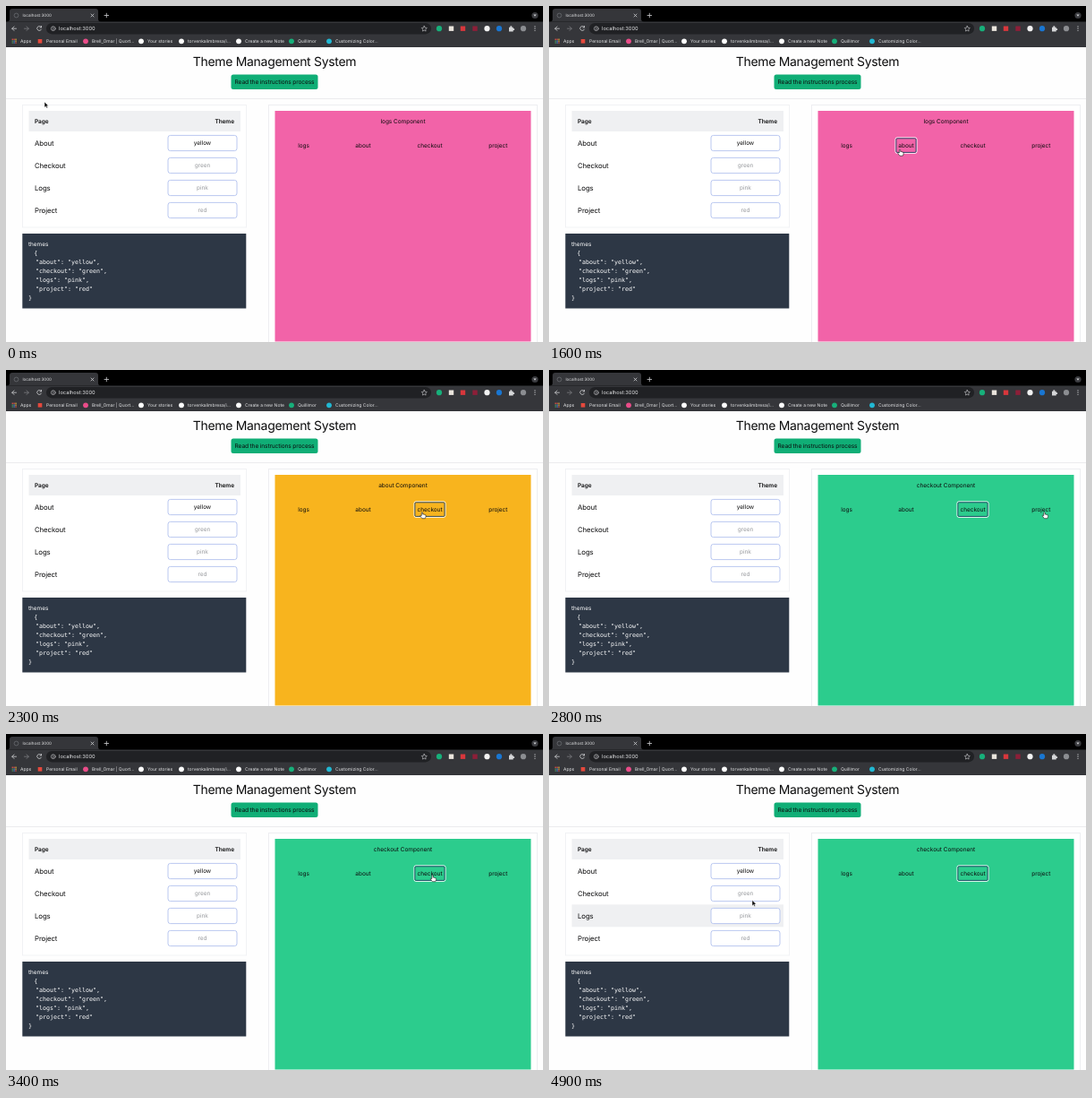
Write an HTML page that moves like this. It is 600 by 375 pixels and loops after 5000 ms.

```html
<!DOCTYPE html>
<html lang="en">
<head>
<meta charset="utf-8">
<title>Theme Management System</title>
<style>
html, body { margin: 0; width: 100%; height: 100%; overflow: hidden; background: #fefefe; }
svg { display: block; width: 100vw; height: 100vh; }
text { font-family: Inter, "Open Sans", sans-serif; font-size: 6.5px; letter-spacing: -.04px; fill: #0c0c0d; text-rendering: geometricPrecision; white-space: pre; }
.title { font-size: 14px; letter-spacing: -.3px; }
.cta { font-size: 6.6px; letter-spacing: -.13px; }
.head { font-weight: 600; }
.name { font-size: 7.8px; letter-spacing: -.1px; }
.hint { fill: #999b9f; }
.mid { text-anchor: middle; }
.end { text-anchor: end; }
.bar text { font-size: 5px; letter-spacing: 0; fill: #e4e5e7; }
.bar .tab { font-size: 4.6px; }
.bar .url { font-size: 5.75px; }
.code text { font-family: "DejaVu Sans Mono", monospace; font-size: 6.65px; letter-spacing: 0; fill: #fff; }
.code .label { font-family: Inter, sans-serif; font-size: 6.4px; }
.line { fill: none; stroke: #d0d1d4; stroke-width: .8; stroke-linecap: round; stroke-linejoin: round; }
</style>
</head>
<body>
<svg viewBox="0 0 600 375" preserveAspectRatio="none">
  <rect width="600" height="375" fill="#fefefe"/>

  <g class="bar">
    <rect width="600" height="46" fill="#35363a"/>
    <rect width="600" height="17.5" fill="#000"/>
    <path d="M1 17.5Q4 17.5 4 14.5V6Q4 3 7 3H100Q103 3 103 6V14.5Q103 17.5 106 17.5Z" fill="#35363a"/>
    <circle cx="11.5" cy="10.5" r="2.4" fill="none" stroke="#696b70" stroke-width=".8"/>
    <text class="tab" x="18.5" y="12.2">localhost:3000</text>
    <path class="line" d="M95 9l3 3m0-3l-3 3M110 10.5h4.6m-2.3-2.3v4.6"/>
    <circle cx="591" cy="10.5" r="3.6" fill="#3b3c40"/>
    <path d="M589.4 9.6h3.2l-1.6 2.2z" fill="#d0d1d4"/>

    <rect x="45" y="19" width="430" height="12.4" rx="6.2" fill="#202124"/>
    <path class="line" d="M11.5 25.2H6.8m2.2-2.3l-2.3 2.3 2.3 2.3M39.3 23.5a2.5 2.5 0 1 0 .2 2.6M39.5 22.4v1.6h-1.6"/>
    <path class="line" style="stroke:#7b7d81" d="M20.5 25.2h4.7m-2.2-2.3l2.3 2.3-2.3 2.3"/>
    <circle class="line" cx="52.8" cy="25.2" r="2.4" style="stroke-width:.6"/>
    <path class="line" style="stroke-width:.7" d="M52.8 25v1.3M52.8 23.9v.05"/>
    <text class="url" x="59" y="27.3">localhost:3000</text>
    <path class="line" style="stroke-width:.6" d="M467.3 22.3l.9 1.9 2.1.3-1.5 1.5.3 2.1-1.8-1-1.8 1 .3-2.1-1.5-1.5 2.1-.3z"/>
    <g id="tools"></g>
    <path d="M562 23.7h1.4a1 1 0 1 1 1.8 0h1.5v1.5a1 1 0 1 1 0 1.7v1.5H562z" fill="#d5d6d8"/>
    <g fill="#d5d6d8"><circle cx="591" cy="22.9" r=".6"/><circle cx="591" cy="25.2" r=".6"/><circle cx="591" cy="27.5" r=".6"/></g>
    <g id="apps"></g>
    <g id="marks"></g>
  </g>

  <text class="title mid" x="300" y="66.5">Theme Management System</text>
  <rect x="251.5" y="76.5" width="97" height="16.5" rx="2.5" fill="#10ae76"/>
  <text class="cta mid" x="300" y="87.3">Read the instructions process</text>
  <path d="M0 103.5H600" stroke="#e6e7ea" stroke-width=".8"/>

  <rect x="18.5" y="110.5" width="250" height="136.5" fill="#fff" stroke="#f0f1f3" stroke-width=".9"/>
  <rect x="25.5" y="117" width="236.5" height="23" fill="#eff0f2"/>
  <text class="head" x="32" y="131.3">Page</text>
  <text class="head end" x="255" y="131.3">Theme</text>
  <rect id="hover" x="25.5" width="236.5" height="25" fill="#eff0f2"/>
  <g id="rows"></g>

  <g class="code">
    <rect x="18.3" y="254" width="250" height="83.5" fill="#2d3745"/>
    <text class="label" x="25" y="268.3">themes</text>
    <text x="31.3" y="277.6">{</text>
    <text x="33" y="288">"about": "yellow",</text>
    <text x="33" y="298">"checkout": "green",</text>
    <text x="33" y="308">"logs": "pink",</text>
    <text x="33" y="318">"project": "red"</text>
    <text x="25" y="327.7">}</text>
  </g>

  <rect x="293.5" y="110.5" width="300" height="270" fill="#fff" stroke="#ecedf0" stroke-width=".9"/>
  <rect id="panel" x="300.5" y="117" width="286" height="257.5"/>
  <text id="heading" class="mid" x="443.5" y="131.2"></text>
  <g id="ring" fill="none">
    <rect class="outer" y="146.9" height="17.4" rx="1.8" stroke="#fff" stroke-width="1"/>
    <rect class="inner" y="147.8" height="15.6" rx="1.2" stroke="#1d3f63" stroke-width=".9"/>
  </g>
  <g id="links"></g>

  <g id="arrow">
    <path d="M0 0V6.2L1.5 4.9 2.5 7.1 3.6 6.6 2.6 4.5H4.5Z" fill="#000" stroke="#fff" stroke-width=".5" stroke-linejoin="round"/>
  </g>
  <g id="hand">
    <path d="M-.7.6Q0-.5.7.6V2.6Q1.5 2.1 1.9 2.9 2.7 2.5 3 3.2 4.1 2.9 4.1 4.1V5.2L3.3 7.2H-.1L-2.3 4.4Q-2.3 3.2-.7 4Z" fill="#fff" stroke="#111" stroke-width=".6" stroke-linejoin="round"/>
  </g>
</svg>
<script>
const LOOP = 5000, STEP = 100;
const $ = id => document.getElementById(id);
const set = (el, attrs) => { for (const k in attrs) el.setAttribute(k, attrs[k]); return el; };
function add(parent, tag, attrs, text) {
  const el = set(document.createElementNS(parent.namespaceURI, tag), attrs);
  if (text) el.textContent = text;
  return parent.appendChild(el);
}

// toolbar dots
[[484, '#17b07a'], [497.5, '#e9e4dc', 1], [510.5, '#d8373c', 1], [524, '#8d1f38', 1],
 [537.5, '#f2f2f2'], [551, '#1976d2'], [578, '#8b8d91']].forEach(([x, fill, square]) =>
  square ? add($('tools'), 'rect', { x: x - 2.7, y: 22.5, width: 5.4, height: 5.4, fill })
         : add($('tools'), 'circle', { cx: x, cy: 25.2, r: 3.1, fill }));

// bookmarks
const dots = ['#e8554a', '#e8554a', '#e5b53c', '#4b9c5f', '#4c86d9', '#e5b53c', '#4b9c5f', '#4c86d9', '#e8554a'];
dots.forEach((fill, i) => add($('apps'), 'rect',
  { x: 6.6 + i % 3 * 1.9, y: 36.6 + Math.floor(i / 3) * 1.9, width: 1.3, height: 1.3, fill }));
[[16, 'Apps'], [45, 'Personal Email', '#e5483c', 1], [96, 'Brell_Omar | Quort...', '#ea4c89'],
 [158, 'Your stories', '#fff'], [203, 'torvenkalimbresa/i...', '#fff'], [267, 'Create a new Note', '#fff'],
 [326, 'Quillimor', '#17b07a'], [368, 'Customizing Color...', '#21b8d3']].forEach(([x, label, fill, square]) => {
  add($('marks'), 'text', { x, y: 41 }, label);
  if (!fill) return;
  if (square) add($('marks'), 'rect', { x: x - 9.3, y: 37, width: 4.6, height: 4.6, fill });
  else add($('marks'), 'circle', { cx: x - 7, cy: 39.3, r: 2.9, fill });
});

// table
const ROW_TOP = 140.3, ROW_H = 25;
[['About', 'yellow'], ['Checkout', 'green'], ['Logs', 'pink'], ['Project', 'red']].forEach(([name, color], i) => {
  const y = 153 + i * ROW_H;
  add($('rows'), 'text', { class: 'name', x: 32, y: y + 2.8 }, name);
  add($('rows'), 'rect', { x: 181, y: y - 8.6, width: 77, height: 17.2, rx: 2.6, fill: '#fff', stroke: '#b3c2ef', 'stroke-width': .9 });
  add($('rows'), 'text', { class: i ? 'mid hint' : 'mid', x: 219.5, y: y + 2.3 }, color);
});

// themed pages: fill, label centre, focus box left and width
const pages = {
  logs: ['#f263a8', 332.5, 322.5, 20],
  about: ['#f8b41e', 399, 387, 24],
  checkout: ['#2ccc8d', 473.5, 456, 35],
  project: ['#f66463', 549.8, 536, 28]
};
for (const name in pages) add($('links'), 'text', { class: 'mid', x: pages[name][1], y: 158 }, name);

// time, page shown, focused link
const states = [
  [0, 'logs'], [1600, 'logs', 'about'], [1700, 'about', 'about'], [2300, 'about', 'checkout'],
  [2400, 'checkout', 'checkout'], [2900, 'project', 'project'], [3400, 'checkout', 'checkout']
];

// pointer: time, x, y
const path = [
  [0, 43, 107], [200, 70, 128], [600, 150, 200], [900, 262, 198], [1300, 375, 168],
  [1500, 392, 160], [1700, 392, 160], [2200, 465, 158.5], [2400, 465, 158.5], [2700, 553.5, 158.5],
  [2900, 553.5, 158.5], [3200, 476.5, 157.5], [3600, 476.5, 157.5], [4200, 300, 200],
  [4500, 246, 206], [4800, 230, 196], [4900, 227, 185.5]
];
function pointer(t) {
  const i = path.findIndex(p => p[0] >= t);
  if (i < 1) return path[i ? path.length - 1 : 0].slice(1);
  const a = path[i - 1], b = path[i], k = (t - a[0]) / (b[0] - a[0]);
  return [a[1] + (b[1] - a[1]) * k, a[2] + (b[2] - a[2]) * k];
}
const show = (el, on) => el.style.display = on ? '' : 'none';

function draw(t) {
  const [, page, focus] = states.filter(s => s[0] <= t).pop();
  $('panel').setAttribute('fill', pages[page][0]);
  $('heading').textContent = page + ' Component';

  show($('ring'), focus);
  if (focus) {
    const [, , left, w] = pages[focus];
    set($('ring').children[0], { x: left, width: w });
    set($('ring').children[1], { x: left + .9, width: w - 1.8 });
  }

  const [x, y] = pointer(t);
  const over = Object.values(pages).some(p => x > p[2] && x < p[2] + p[3] && y > 147 && y < 164);
  const icon = $(over ? 'hand' : 'arrow');
  show($('hand'), over);
  show($('arrow'), !over);
  icon.setAttribute('transform', `translate(${x} ${y})`);

  // row highlight trails the pointer by one step
  const [hx, hy] = pointer(Math.max(0, t - STEP));
  const row = Math.floor((hy - ROW_TOP) / ROW_H);
  const inside = hx > 25.5 && hx < 262 && row >= 0 && row < 4;
  show($('hover'), inside);
  if (inside) $('hover').setAttribute('y', ROW_TOP + row * ROW_H);
}

const start = performance.now();
function tick() {
  const t = (performance.now() - start) % LOOP;
  draw(Math.floor(t / STEP) * STEP);
  requestAnimationFrame(tick);
}
tick();
</script>
</body>
</html>
```
